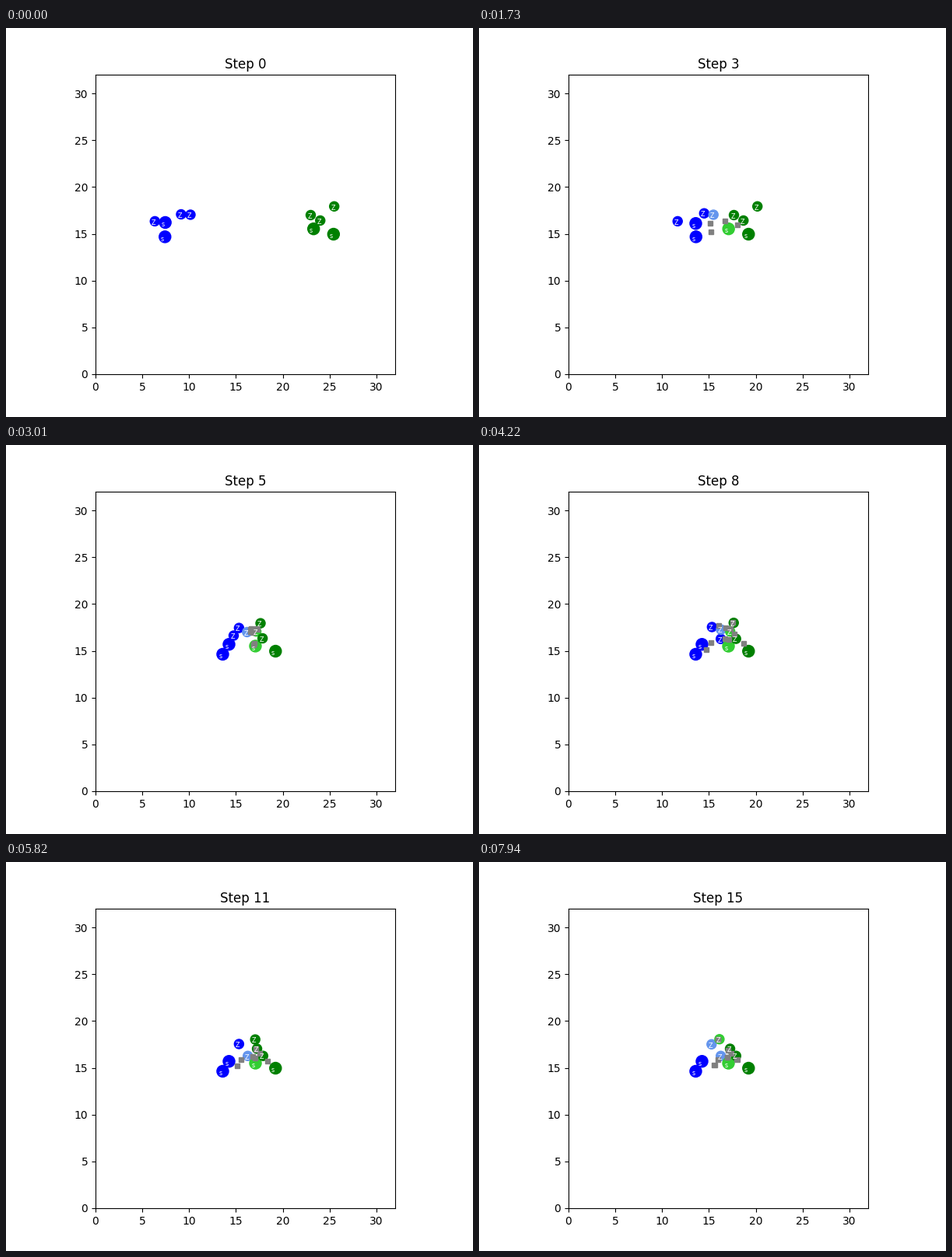
Recreate the animation shown at these times as a matplotlib script. Size 600x500 px, loop 8 s.

```python
import numpy as np
import matplotlib.pyplot as plt
from matplotlib.animation import FuncAnimation
from matplotlib.patches import Circle, Rectangle

SUBSTEPS = 8      # simulation ticks per step
TICKS = 125
SIZE = 32
BULLET = 0.5

# shooters (s) and fighters (Z): radius, speed per tick, attack range
KINDS = {"s": (0.625, 4.13 / 16, 6), "Z": (0.5, 3.15 / 16, 2.1)}
COLORS = {"b": ("blue", "cornflowerblue"), "g": ("green", "limegreen")}

START = {
    "b1": (7.45, 16.21), "b2": (7.42, 14.68), "b3": (6.34, 16.34),
    "b4": (9.14, 17.08), "b5": (10.14, 17.04),
    "g1": (23.29, 15.53), "g2": (25.42, 14.96), "g3": (22.98, 17.0),
    "g4": (24.0, 16.42), "g5": (25.49, 17.93),
}
NAMES = list(START)
TEAM = [name[0] for name in NAMES]
KIND = ["s" if name[1] in "12" else "Z" for name in NAMES]
RADIUS, SPEED, REACH = np.array([KINDS[k] for k in KIND]).T
HEADING = np.array([1 if team == "b" else -1 for team in TEAM])

VICTIM, DEATH = NAMES.index("b5"), 84


def focus(i, fallen):
    """Index of the enemy that unit i goes for."""
    name = NAMES[i]
    if TEAM[i] == "g":
        goal = "b5" if not fallen else "b4" if name == "g5" else "b3"
    elif name in ("b4", "b5"):
        goal = "g5" if fallen else "g3"
    else:
        goal = "g1"
    return NAMES.index(goal)


def push_apart(pos, alive):
    """Move every overlapping pair apart, half of the overlap each."""
    delta = pos[:, None] - pos[None, :]
    dist = np.hypot(delta[..., 0], delta[..., 1])
    np.fill_diagonal(dist, np.inf)
    overlap = np.maximum((RADIUS[:, None] + RADIUS) / dist - 1, 0)
    overlap *= np.outer(alive, alive)
    return pos + (delta * overlap[..., None]).sum(axis=1) / 2


def simulate():
    """Return (positions, alive, shots) for every tick."""
    pos = np.array(list(START.values()))
    history = []
    for tick in range(TICKS):
        alive = np.ones(len(NAMES), bool)
        alive[VICTIM] = tick < DEATH
        if tick % SUBSTEPS == 0:
            fallen = not alive[VICTIM]
            shots, moving = {}, np.zeros(len(NAMES))
            for i in np.flatnonzero(alive):
                goal = focus(i, fallen)
                if np.hypot(*(pos[goal] - pos[i])) < REACH[i]:
                    shots[i] = goal
                elif TEAM[i] == "g" or not fallen:
                    moving[i] = 1
        history.append((pos, alive, shots))
        pos = pos.copy()
        pos[:, 0] += moving * HEADING * SPEED
        pos = push_apart(pos, alive)
    return history


history = simulate()

fig, ax = plt.subplots(figsize=(6, 5), dpi=100)
ax.set(xlim=(0, SIZE), ylim=(0, SIZE), aspect="equal",
       xticks=range(0, SIZE, 5), yticks=range(0, SIZE, 5))
title = ax.set_title("Step 0")

discs = [ax.add_patch(Circle((0, 0), r)) for r in RADIUS]
labels = [ax.text(0, 0, k, color="white", fontsize="xx-small") for k in KIND]
bullets = [ax.add_patch(Rectangle((0, 0), BULLET, BULLET, color="gray"))
           for _ in NAMES]


def update(frame):
    # two drawn frames per tick, each tick centred on its nominal time
    tick = min((frame + 1) // 2, TICKS - 1)
    step, sub = divmod(tick, SUBSTEPS)
    pos, alive, shots = history[tick]
    title.set_text(f"Step {step}")
    hit = {goal for i, goal in shots.items() if alive[i]}

    for i, (disc, label, bullet) in enumerate(zip(discs, labels, bullets)):
        disc.center = pos[i]
        disc.set_color(COLORS[TEAM[i]][i in hit])
        label.set_position(pos[i] - RADIUS[i] / np.sqrt(2))
        disc.set_visible(alive[i])
        label.set_visible(alive[i])
        bullet.set_visible(bool(alive[i]) and i in shots)
        if i in shots:
            bullet.set_xy(pos[i] + (pos[shots[i]] - pos[i]) * sub / SUBSTEPS)
    return [title, *discs, *bullets, *labels]


anim = FuncAnimation(fig, update, frames=2 * TICKS, interval=32,
                     repeat=True, repeat_delay=0, blit=False)
plt.show()
```
